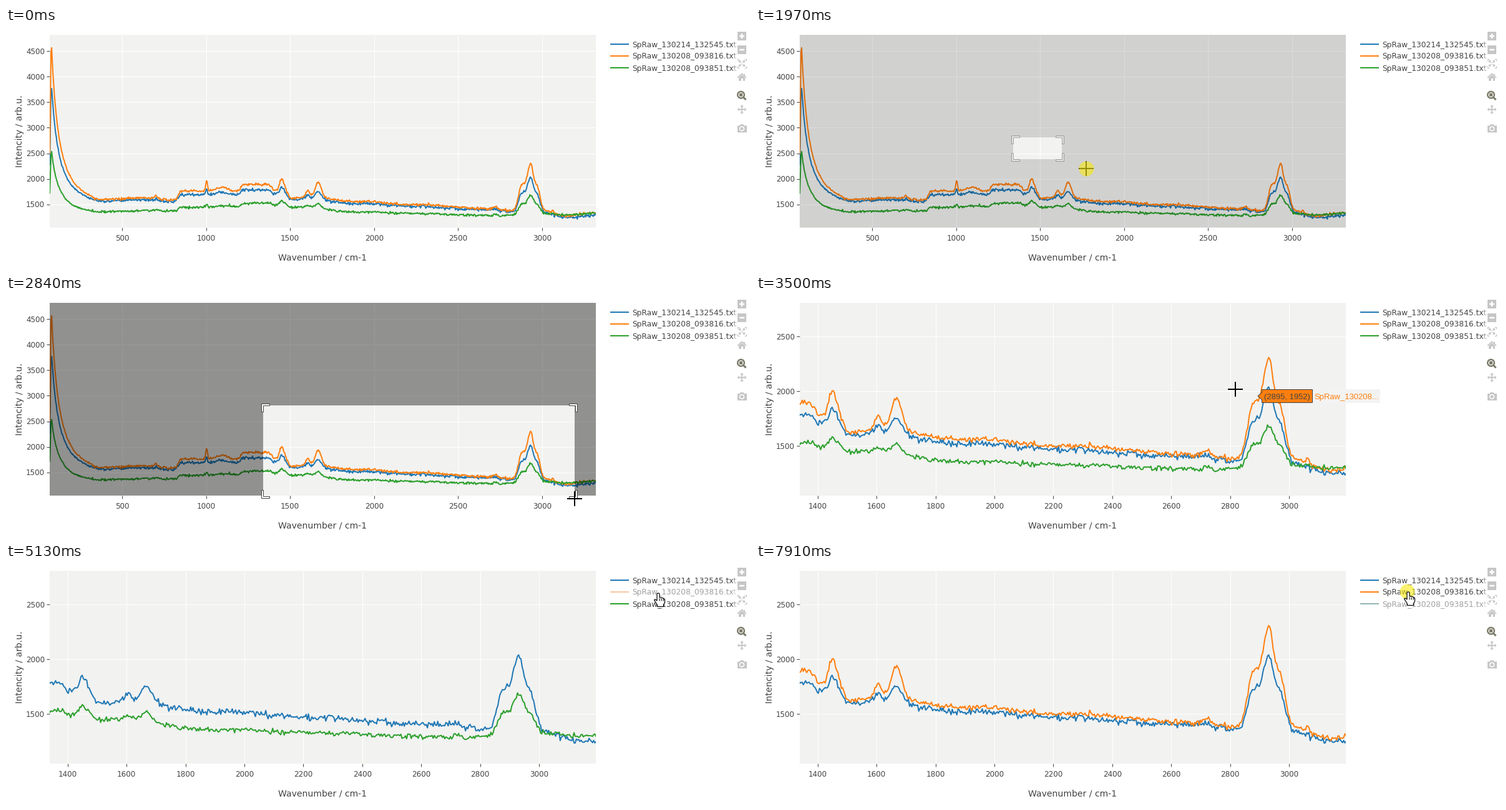
A matplotlib script for the animation above (8 s loop, 1192 px wide and 386 px high).

```python
import numpy as np
import matplotlib.pyplot as plt
from matplotlib.animation import FuncAnimation
from matplotlib.patches import Circle, Polygon, Rectangle

W, H = 1192, 386
STEP, LOOP = 50, 8000
LEFT, RIGHT, TOP, BOTTOM = 70, 945, 11, 321
INK, PALE, ACTIVE = "#444444", "#c6c6c6", "#7d7d6c"
COLORS = ["#1f77b4", "#ff7f0e", "#2ca02c"]
FADED = ["#8fbbd9", "#f8c8a2", "#8fb5b3"]
NAMES = ["SpRaw_130214_132545.txt", "SpRaw_130208_093816.txt",
         "SpRaw_130208_093851.txt"]

# Spectrum model: a floor per series plus shared features scaled by a gain
FLOOR_X = [69, 1100, 1550, 1780, 2700, 3150, 3319]
FLOORS = [[1580, 1545, 1558, 1525, 1392, 1250, 1300],
          [1605, 1578, 1575, 1562, 1415, 1280, 1345],
          [1345, 1380, 1430, 1360, 1285, 1300, 1335]]
BROAD_GAIN, SHARP_GAIN = (0.75, 1, 0.4), (0.57, 1, 0.32)
NOISE = (15, 13, 11.5)
# start, end, softness, height
PLATEAUS = [(832, 1490, 15, 185), (1205, 1390, 12, 130), (2857, 2990, 16, 560)]
# centre, width, height
HUMPS = [(360, 45, -40), (630, 80, 45), (1095, 32, 75), (1640, 90, 95),
         (2000, 70, 30), (2300, 80, 22), (2930.5, 14, 400), (3030, 30, 60)]
PEAKS = [(701, 8, 50), (1003, 5, 215), (1450, 14, 225), (1606, 10, 130),
         (1668, 17, 275), (2722, 12, 52), (3061, 5, 52)]

# Pointer moves: start, end, target x and y, sideways bow
START = (1020, 361)
MOVES = [(430, 1200, 533, 204, 0), (1250, 1660, 412, 176, 0),
         (1700, 2620, 911, 326, 21), (2850, 2885, 911, 319, 0),
         (3150, 3540, 768, 150, 0), (3600, 3920, 1005, 119, 0),
         (3960, 4420, 1045, 47, 0), (6890, 7050, 1045, 62, 0),
         (7400, 7760, 1045, 45, 0)]
CLICKS = [(1700, 2840), (4730, 4830), (6250, 6350), (7210, 7260), (7910, 8000)]
HOVERS = [(3230, 3430, 2998, 1552), (3430, 3650, 2895, 1952)]
ZOOM_AT = 2880
ANCHOR = (412, 176)

ARROW = np.array([(0, 0), (0, 16), (4, 12.5), (6.5, 18), (9, 17),
                  (6.5, 11.5), (11.5, 11.5)])
HAND = np.array([(-2, 1), (-1, 0), (1, 0), (2, 1), (2, 7), (5.5, 7), (8.5, 8.3),
                 (10.5, 10), (10.5, 15), (8.5, 18.5), (8.5, 21.5), (-1.5, 21.5),
                 (-1.5, 19), (-6.5, 11), (-5, 9.8), (-2, 12)])
CORNER = np.array([(-3.5, 9.5), (-0.5, 9.5), (-0.5, -0.5), (9.5, -0.5),
                   (9.5, -3.5), (-3.5, -3.5)])

fig = plt.figure(figsize=(W / 100, H / 100), dpi=100, facecolor="white")
ax = fig.add_axes([0, 0, 1, 1])
ax.set_xlim(0, W)
ax.set_ylim(H, 0)
ax.axis("off")


def text(x, y, s, size=12, color=INK, font="DejaVu Sans", **kw):
    kw.setdefault("va", "baseline")
    return ax.text(x, y, s, fontsize=size * 0.72, color=color, family=font, **kw)


def stroke(xs, ys, color, width, **kw):
    kw.setdefault("solid_capstyle", "butt")
    return ax.plot(xs, ys, color=color, lw=width * 0.72, **kw)[0]


def box(x, y, w, h, color, **kw):
    return ax.add_patch(Rectangle((x, y), w, h, fc=color, lw=0, **kw))


def shape(pts, fill, edge="none", width=0, **kw):
    return ax.add_patch(Polygon(pts, closed=True, fc=fill, ec=edge,
                                lw=width * 0.72, **kw))


def ease(u):
    u = np.clip(u, 0, 1)
    return u * u * (3 - 2 * u)


def bells(x, rows):
    return sum(h * np.exp(-0.5 * ((x - c) / w) ** 2) for c, w, h in rows)


def spectra():
    rng = np.random.default_rng(14)
    x = np.linspace(69, 3319, 830)
    past = np.maximum(x - 80, 0)
    rise = np.clip(0.3 + (x - 69) / 12, 0, 1)
    broad = rise * (1050 * np.exp(-past / 22) + 1960 * np.exp(-past / 75))
    broad += bells(x, HUMPS)
    for a, b, soft, h in PLATEAUS:
        broad += h / 2 * (np.tanh((x - a) / soft) - np.tanh((x - b) / soft))
    sharp = bells(x, PEAKS)
    calm = np.where(x < 300, 0.6, 1)
    return x, [np.interp(x, FLOOR_X, floor) + g * broad + s * sharp
               + calm * rng.normal(0, n, x.size)
               for floor, g, s, n in zip(FLOORS, BROAD_GAIN, SHARP_GAIN, NOISE)]


class View:
    """One zoom level: grid, ticks, labels and traces."""

    def __init__(self, xref, yref, xticks, yticks):
        self.xref, self.yref = xref, yref
        self.frame = []
        for v in xticks:
            px = self.px(v)
            self.frame += [
                stroke([px, px], [TOP, BOTTOM], "white", 1, zorder=1),
                stroke([px, px], [BOTTOM, BOTTOM + 5], INK, 1),
                text(px, 341.5, str(v), ha="center")]
        for v in yticks:
            py = self.py(v)
            self.frame += [
                stroke([LEFT, RIGHT], [py, py], "white", 1, zorder=1),
                stroke([LEFT - 5, LEFT], [py, py], INK, 1),
                text(62, py + 4.5, str(v), ha="right")]
        self.traces = []
        for k, y in enumerate(curves):
            line = stroke(self.px(wave), self.py(y), COLORS[k], 2, zorder=3,
                          solid_joinstyle="round")
            line.set_clip_path(plot)
            self.traces.append(line)

    def px(self, v):
        value, pos, scale = self.xref
        return pos + (v - value) * scale

    def py(self, v):
        value, pos, scale = self.yref
        return pos - (v - value) * scale

    def show(self, on, hidden):
        for artist in self.frame:
            artist.set_visible(on)
        for k, line in enumerate(self.traces):
            line.set_visible(on and k != hidden)


def modebar():
    box(1167, 0, 25, 175, "white", alpha=0.6, zorder=4)
    z = dict(zorder=5)
    for y in (6, 28):
        box(1172, y, 14, 14, PALE, **z)
        stroke([1175, 1183], [y + 7, y + 7], "white", 2.5, **z)
    stroke([1179, 1179], [9, 17], "white", 2.5, **z)
    for sx in (-1, 1):
        for sy in (-1, 1):
            x, y = 1179 + 7 * sx, 57 + 7 * sy
            stroke([x, x, x - 3 * sx], [y - 3 * sy, y, y], PALE, 1.2, **z)
            stroke([1179 + sx, 1179 + 4 * sx], [57 + sy, 57 + 4 * sy], PALE, 1.5, **z)
            shape([(x - 2 * sx, y - 2 * sy), (x - 6 * sx, y - 2 * sy),
                   (x - 2 * sx, y - 6 * sy)], PALE, **z)
    stroke([1172, 1179, 1186], [80, 73.5, 80], PALE, 1.8, **z)
    shape([(1174, 80), (1179, 75.5), (1184, 80), (1184, 85), (1174, 85)], PALE, **z)
    box(1177.5, 81, 3, 4, "white", **z)
    box(1182, 73.5, 2, 4, PALE, **z)
    ax.add_patch(Circle((1177.5, 107.5), 5.3, fc="white", ec=ACTIVE, lw=1.8, **z))
    box(1175, 105, 5, 5, ACTIVE, **z)
    stroke([1181.5, 1185.5], [111.5, 115.5], ACTIVE, 3, **z)
    for dx, dy in ((1, 0), (-1, 0), (0, 1), (0, -1)):
        tip = np.array([1179 + 7.5 * dx, 131 + 7.5 * dy])
        back, side = 3 * np.array([dx, dy]), 3 * np.array([dy, dx])
        stroke([1179, 1179 + 6 * dx], [131, 131 + 6 * dy], PALE, 1.8, **z)
        shape([tip, tip - back + side, tip - back - side], PALE, **z)
    box(1171.5, 157, 15, 10.5, PALE, **z)
    box(1176, 154.5, 6, 3, PALE, **z)
    ax.add_patch(Circle((1179, 162), 3.4, fc=PALE, ec="white", lw=1.1, **z))


plot = box(LEFT, TOP, RIGHT - LEFT, BOTTOM - TOP, "#f2f2f1", zorder=0)
wave, curves = spectra()
full = View((500, 186, 0.2692), (4500, 37, 0.08233),
            range(500, 3001, 500), range(1500, 4501, 500))
zoomed = View((1400, 98.9, 0.47188), (2500, 65, 0.176),
              range(1400, 3001, 200), range(1500, 2501, 500))
text(507.5, 373.5, "Wavenumber / cm-1", 14, ha="center")
text(26, 166, "Intencity / arb.u.", 14, ha="center", rotation=90,
     rotation_mode="anchor")

legend = []
for k, name in enumerate(NAMES):
    y = 26 + 19 * k
    legend.append((stroke([968, 998], [y, y], COLORS[k], 2),
                   text(1003, y + 4.5, name, 12.2)))
modebar()

shroud = [box(0, 0, 0, 0, "black", zorder=6) for _ in range(4)]
corners = [shape(CORNER, "white", INK, 1, zorder=7) for _ in range(4)]

tag = shape([(0, 0)] * 3, COLORS[1], INK, 1, zorder=8)
tag_side = box(0, 0, 108, 22, "#f3f3f3", zorder=7.5)
tag_text = text(0, 0, "", 13, font="Liberation Sans", zorder=8.5)
tag_name = text(0, 0, "SpRaw_130208...", 13, COLORS[1], "Liberation Sans", zorder=8.5)
tag_parts = [tag, tag_side, tag_text, tag_name]

cross = [stroke([0], [0], "black", 2, zorder=9) for _ in range(2)]
halo = ax.add_patch(Circle((0, 0), 12, fc="#f8ea10", lw=0, alpha=0.6, zorder=10))
arrow = shape(ARROW, "white", "black", 1, zorder=11)
hand = shape(HAND, "white", "black", 1.2, zorder=11)
knuckles = [stroke([0], [0], "black", 1, zorder=12) for _ in range(3)]


def pointer(t):
    pos = np.array(START, float)
    for a, b, x, y, bow in MOVES:
        s = ease((t - a) / (b - a))
        pos += s * (np.array([x, y]) - pos)
        pos[1] += 4 * s * (1 - s) * bow
    return pos


def cursor_kind(t, x, y):
    if t < 430:
        return None
    if t < 3960:
        return "arrow" if x > RIGHT and t < 1200 else "cross"
    return "arrow" if y > 72 else "hand"


def draw_cursor(t):
    x, y = pos = pointer(t)
    kind = cursor_kind(t, x, y)
    for line in cross:
        line.set_visible(kind == "cross")
    cross[0].set_data([x - 12, x + 12], [y, y])
    cross[1].set_data([x, x], [y - 12, y + 12])
    arrow.set_visible(kind == "arrow")
    arrow.set_xy(ARROW + pos)
    hand.set_visible(kind == "hand")
    hand.set_xy(HAND + pos)
    for k, line in enumerate(knuckles):
        dx = 2 + 3.1 * k
        line.set_visible(kind == "hand")
        line.set_data([x + dx, x + dx], [y + 7.5, y + 12])
    halo.set_visible(any(a <= t < b for a, b in CLICKS))
    halo.set_center((x, y) if kind == "cross" else (x - 1.5, y - 0.5))


def draw_selection(t):
    x0, y0 = ANCHOR
    x1, y1 = pointer(t - 60)
    y1 = min(y1, BOTTOM)
    on = 1700 < t < ZOOM_AT and x1 - x0 > 10
    level = np.clip((t - 1890) / 300, 0, 1)
    bounds = [(LEFT, TOP, RIGHT - LEFT, y0 - TOP),
              (LEFT, y1, RIGHT - LEFT, BOTTOM - y1),
              (LEFT, y0, x0 - LEFT, y1 - y0),
              (x1, y0, RIGHT - x1, y1 - y0)]
    for patch, b in zip(shroud, bounds):
        patch.set_visible(on)
        patch.set_bounds(*b)
        patch.set_alpha(0.4 * level)
    spots = [(x0, y0, 1, 1), (x1, y0, -1, 1), (x0, y1, 1, -1), (x1, y1, -1, -1)]
    for patch, (x, y, sx, sy) in zip(corners, spots):
        patch.set_visible(on)
        patch.set_xy(CORNER * (sx, sy) + (x, y))
        patch.set_alpha(min(1, 1.3 * level))


def draw_hover(t):
    point = next(((x, y) for a, b, x, y in HOVERS if a <= t < b), None)
    for part in tag_parts:
        part.set_visible(point is not None)
    if point is None:
        return
    x, y = round(zoomed.px(point[0])), round(zoomed.py(point[1]))
    tag.set_xy([(x, y), (x + 6.5, y - 6), (x + 6.5, y - 10.5), (x + 87.5, y - 10.5),
                (x + 87.5, y + 10.5), (x + 6.5, y + 10.5), (x + 6.5, y + 6)])
    tag_side.set_xy((x + 88, y - 11))
    tag_text.set_text(f"({point[0]}, {point[1]})")
    tag_text.set_position((x + 10, y + 5))
    tag_name.set_position((x + 90, y + 5))


def draw(i):
    t = i * STEP + 40
    hidden = 1 if 5130 <= t < 6650 else 2 if t >= 7410 else None
    full.show(t < ZOOM_AT, hidden)
    zoomed.show(t >= ZOOM_AT, hidden)
    for k, (line, label) in enumerate(legend):
        line.set_color(FADED[k] if k == hidden else COLORS[k])
        label.set_alpha(0.5 if k == hidden else 1)
    draw_selection(t)
    draw_hover(t)
    draw_cursor(t)
    return []


anim = FuncAnimation(fig, draw, frames=LOOP // STEP, interval=STEP, repeat=True)
plt.show()
```
